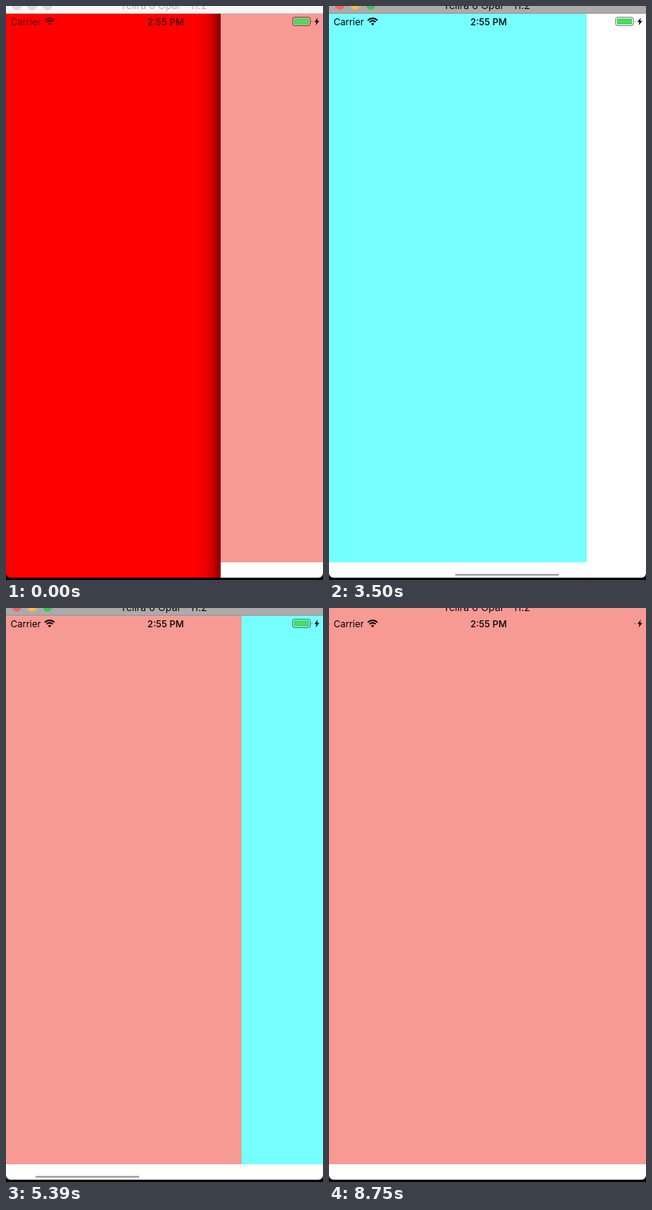
Recreate the animation shown at these times as an HTML page. Size 412 by 744 pixels, loop 8.82 s.

```html
<!DOCTYPE html>
<html lang="en">
<head>
<meta charset="utf-8">
<title>Drawer and pages</title>
<style>
  html, body { margin: 0; width: 100%; height: 100%; overflow: hidden; background: #000; }
  svg { display: block; width: 412px; height: 744px; }
  text { font-family: Inter, Roboto, sans-serif; }
</style>
</head>
<body>
<svg viewBox="0 0 412 744">
  <defs>
    <clipPath id="screen"><rect y="-20" width="412" height="761" rx="6"/></clipPath>
    <linearGradient id="shade">
      <stop offset="0" stop-opacity="0"/>
      <stop offset=".4" stop-opacity=".06"/>
      <stop offset=".7" stop-opacity=".2"/>
      <stop offset="1" stop-opacity=".48"/>
    </linearGradient>
  </defs>

  <g clip-path="url(#screen)">
    <rect width="412" height="741" fill="#f00"/>
    <g id="content">
      <rect id="shadow" x="-34" width="34" height="741" fill="url(#shade)"/>
      <rect width="414" height="741" fill="#fff"/>
      <g id="pages">
        <rect width="414" height="721" fill="#f89a94"/>
        <rect x="414" width="414" height="721" fill="#76ffff"/>
      </g>
      <rect id="thumb" y="736" width="135" height="2.4" rx="1.2"/>
    </g>
  </g>

  <g id="status">
    <g id="carrier">
      <text x="6" y="24.5" font-size="12">Carrier</text>
      <g fill="none" stroke="currentColor" stroke-width="2">
        <path d="M50.4 18.6a9 9 0 0 1 12.6 0M52.7 20.9a5.7 5.7 0 0 1 8 0"/>
        <path d="M56.7 25.2l-2 -2.2a3 3 0 0 1 4 0z" fill="currentColor" stroke="none"/>
      </g>
    </g>
    <text id="clock" x="207.5" y="24.5" font-size="12" font-weight="500" text-anchor="middle">2:55 PM</text>
    <g id="battery">
      <rect x="372.5" y="14.5" width="23" height="11" rx="2.5" fill="none" stroke="#000" stroke-opacity=".5"/>
      <rect x="374" y="16" width="20" height="8" rx="1" fill="#4cd964"/>
    </g>
    <path d="M397 18.2q1.6 1.8 0 3.6z" fill-opacity=".6"/>
    <path d="M405.4 15l-4.6 5.8h2.7l-1 4.4 4.6-6h-2.8z"/>
  </g>

  <rect id="bar" width="412" height="10"/>
  <rect id="rule" y="9" width="412" height="1" fill-opacity=".13"/>
  <g id="lights">
    <circle cx="14" cy="-1" r="5.8"/>
    <circle cx="34" cy="-1" r="5.8"/>
    <circle cx="54" cy="-1" r="5.8"/>
  </g>
  <text id="title" x="205" y="4" font-size="13" text-anchor="middle">Telira 6 Opal - 11.2</text>
</svg>

<script>
const LOOP = 8820, TICK = 70, PAGE = 414, OPEN = 279, PINK = '#f89a94';
const $ = id => document.getElementById(id);
const set = (el, attrs) => { for (const k in attrs) el.setAttribute(k, attrs[k]); };
const within = (t, a, b) => t >= a && t < b;

// [start, end, from, to]
const menuMoves = [
  [1750, 2162, OPEN, 0],
  [6650, 7090, 0, OPEN],
  [8050, 8400, OPEN, 0]
];
const pageMoves = [
  [2450, 3360, 0, PAGE],
  [3360, 3920, PAGE, 2 * PAGE],
  [4410, 4893, 2 * PAGE, PAGE],
  [4893, 5670, PAGE, 0]
];

const ease = p => 1 - Math.pow(1 - Math.pow(p, 1.7), 2.13);

function track(moves, t) {
  let value = moves[0][2];
  for (const [start, end, from, to] of moves) {
    if (t < start) break;
    value = from + (to - from) * ease(Math.min(1, (t - start) / (end - start)));
  }
  return value;
}

function thumbAlpha(t) {
  const fade = start => Math.max(0, Math.min(1, 1 - (t - start + TICK) / 280));
  if (within(t, 2520, 4480)) return t > 4200 ? 0 : fade(4060);
  if (within(t, 4480, 6090)) return fade(5810);
  return within(t, 6090, 6720) ? 1 : 0;
}

function draw(t) {
  const menu = track(menuMoves, t), off = track(pageMoves, t);
  const inactive = t < 1540, hover = within(t, 1540, 2240);
  const plain = menu < 0.5 && off < 0.5;

  set($('content'), { transform: `translate(${menu.toFixed(1)} 0)` });
  set($('shadow'), { visibility: menu > 0.5 ? 'visible' : 'hidden' });
  set($('pages'), { transform: `translate(${(-off).toFixed(1)} 0)` });
  set($('thumb'), {
    x: 3 + off * 0.3265,
    fill: within(t, 6090, 6720) ? PINK : '#a6a6a6',
    opacity: thumbAlpha(t)
  });

  const ink = menu > 40 ? '#5c0000' : '#000';
  set($('carrier'), { fill: ink, color: ink });
  set($('clock'), { fill: menu > 210 ? '#380000' : '#000' });
  set($('battery'), { visibility: plain ? 'hidden' : 'visible' });

  set($('bar'), { fill: plain ? PINK : inactive ? '#f6f6f6' : '#aeaaab' });
  set($('rule'), { visibility: plain ? 'hidden' : 'visible' });
  set($('title'), { fill: inactive ? '#b4b4b4' : '#0a0808' });
  set($('lights'), { visibility: plain ? 'hidden' : 'visible' });
  const colors = inactive ? ['#dcdcdc', '#dcdcdc', '#dcdcdc']
    : ['#fc605b', hover ? PINK : '#fdbc40', '#34c84a'];
  [...$('lights').children].forEach((dot, i) => set(dot, {
    fill: colors[i],
    stroke: inactive ? '#d0d0d0' : i === 0 && hover ? '#c23a36' : 'none'
  }));
}

const begin = performance.now();
function frame() {
  const t = (performance.now() - begin) % LOOP;
  draw(Math.floor(t / TICK) * TICK);
  requestAnimationFrame(frame);
}
draw(0);
requestAnimationFrame(frame);
</script>
</body>
</html>
```
